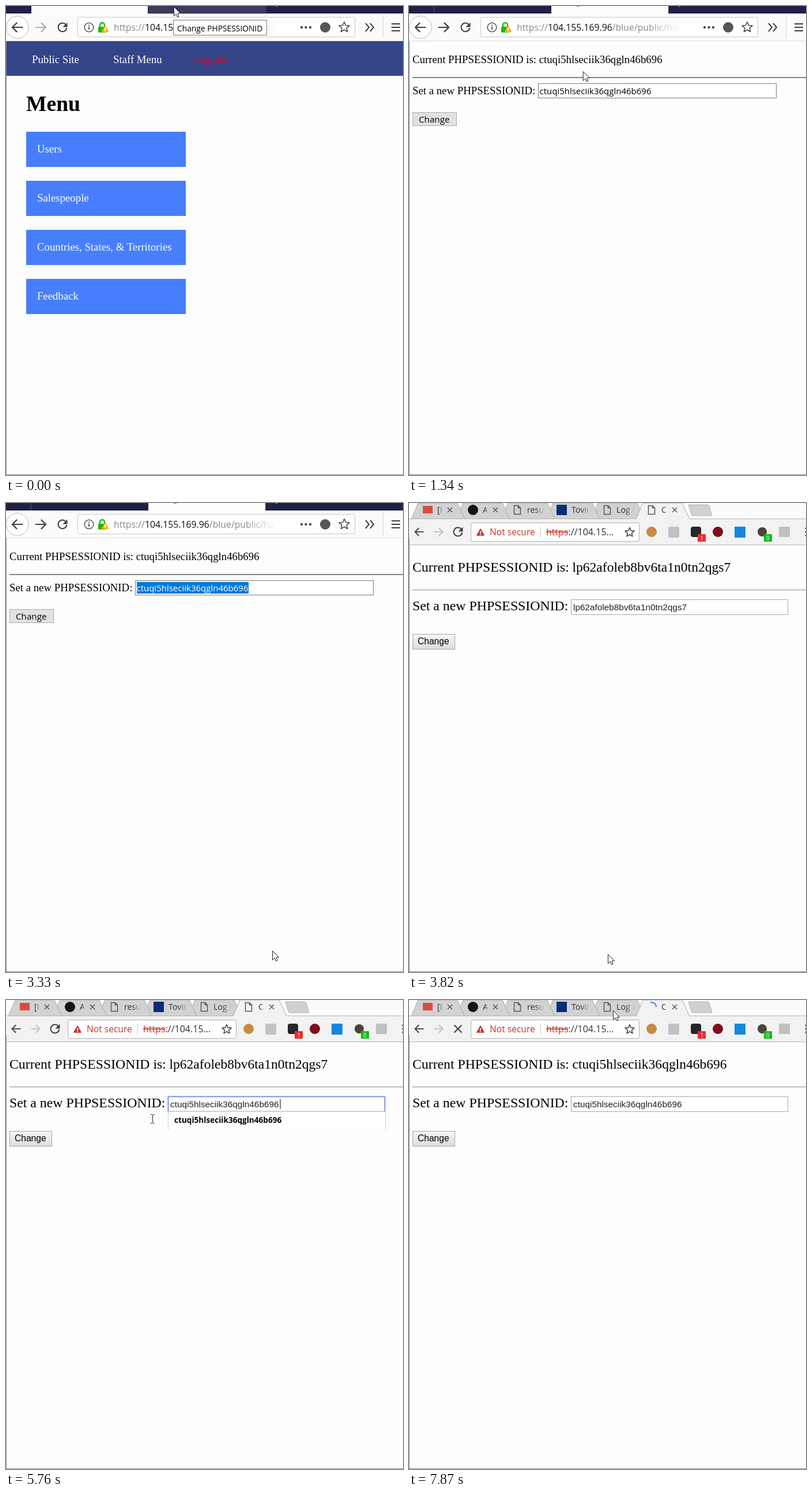
These frames come from a looping animation (689x813 px, 8 s). An HTML page:

```html
<!DOCTYPE html>
<html lang="en">
<head>
<meta charset="utf-8">
<title>Session change</title>
<style>
  html, body { margin: 0; width: 100%; height: 100%; overflow: hidden; background: #fdfdfd; }
  svg { display: block; }
  #stage { width: 100vw; height: 100vh; }
  text { white-space: pre; }
  .serif { font-family: "Liberation Serif", serif; }
  .arial { font: 15.5px "Liberation Sans", sans-serif; }
  .ui { font-family: "Open Sans", sans-serif; }
  .line { fill: none; stroke: #3f3f44; stroke-width: 2; }
  .thin { fill: none; stroke: #555; stroke-width: 1.5; }
</style>
</head>
<body>
<svg id="stage" viewBox="0 0 689 813" preserveAspectRatio="none"></svg>
<script>
const OLD_ID = 'lp62afoleb8bv6ta1n0tn2qgs7';
const NEW_ID = 'ctuqi5hlseciik36qgln46b696';
const LOOP = 8000;

const rect = (x, y, w, h, fill, more = '') =>
  `<rect x="${x}" y="${y}" width="${w}" height="${h}" fill="${fill}" ${more}/>`;
const box = (x, y, w, h, fill, stroke, more = '') =>
  rect(x + .5, y + .5, w, h, fill, `stroke="${stroke}" ${more}`);
const dot = (x, y, r, fill, more = '') => `<circle cx="${x}" cy="${y}" r="${r}" fill="${fill}" ${more}/>`;
const path = (d, more = 'class="line"') => `<path d="${d}" ${more}/>`;
const text = (x, y, size, str, cls = 'serif', more = '') =>
  `<text x="${x}" y="${y}" class="${cls}" style="font-size:${size}px" ${more}>${str}</text>`;
const group = (id, body) => `<g id="${id}">${body}</g>`;
const cross = (x, y, r, more) => path(`M${x - r} ${y - r}l${2 * r} ${2 * r}m0 ${-2 * r}l${-2 * r} ${2 * r}`, more);

function star(cx, cy, r) {
  const points = Array.from({ length: 10 }, (_, i) => {
    const a = i * Math.PI / 5 - Math.PI / 2, q = i % 2 ? r * .45 : r;
    return `${(cx + q * Math.cos(a)).toFixed(1)},${(cy + q * Math.sin(a)).toFixed(1)}`;
  });
  return `<polygon points="${points.join(' ')}" fill="none" stroke="#4a4a4e" stroke-width="1.6" stroke-linejoin="round"/>`;
}

const arrow = (x, y, dir, color, r = 8) => path(
  `M${x - dir * r} ${y}h${dir * 2 * r}m${-dir * r * .9} ${-r * .9}l${dir * r * .9} ${r * .9}l${-dir * r * .9} ${r * .9}`,
  `fill="none" stroke="${color}" stroke-width="2.2"`);

const reload = (x, y) => path(`M${x + 5.5} ${y - 5}a7.4 7.4 0 1 0 1.8 6`) +
  path(`M${x + 8.5} ${y - 8.5}v8h-8z`, 'fill="#3f3f44"');

const warning = (x, y, r, color) =>
  path(`M${x} ${y - r}l${r} ${1.8 * r}h${-2 * r}z`, `fill="${color}" stroke="${color}" stroke-linejoin="round"`) +
  rect(x - 1, y - r * .35, 2, r * .6, '#fff') + rect(x - 1, y + r * .42, 2, 1.6, '#fff');

function firefox() {
  const strip = rect(0, 0, 689, 13, '#1f2147') +
    group('tabMenu', rect(44, 0, 202, 13, '#fdfdfd') + rect(247, 0, 203, 12, '#3a3c5c')) +
    group('tabSession', rect(247, 0, 203, 13, '#fdfdfd') + rect(43, 0, 1, 12, '#4b4d70') +
      rect(291, 0, 5, 1, '#777')) +
    rect(450, 0, 1, 12, '#4b4d70') + rect(468, 0, 3, 1, '#b5b5c4');
  const bar = rect(0, 13, 689, 48, '#fbfbfb') + rect(0, 60, 689, 1, '#dcdcdc') +
    dot(20, 37, 19.3, '#fff', 'stroke="#b8b8b8"') + arrow(20, 37, -1, '#3f3f44', 9) +
    group('forwardOff', arrow(60, 37, 1, '#aaa', 9)) + group('forwardOn', arrow(60, 37, 1, '#3f3f44', 9)) +
    reload(98, 37) +
    box(124, 19, 481, 34, '#fff', '#c8c8c8', 'rx="2" id="urlBox"') +
    dot(144, 37, 7.8, 'none', 'stroke="#555" stroke-width="1.5"') + rect(143, 36, 2, 5, '#555') + rect(143, 32.5, 2, 2, '#555') +
    path('M163 37v-4a4 4 0 0 1 8 0v4', 'fill="none" stroke="#12bc00" stroke-width="2.4"') +
    rect(160, 36, 14, 10, '#12bc00', 'rx="1.5"') + warning(172, 40, 6, '#ffaf0f') +
    `<text x="187" y="43" class="ui" style="font-size:15.8px" fill="#8a8a8a">https://<tspan fill="#111">104.155.169.96</tspan>/blue/public/<tspan id="urlEnd"></tspan></text>` +
    rect(415, 22, 55, 30, 'url(#fade)') + rect(470, 22, 30, 30, '#fff') +
    [513, 520.5, 528].map(x => dot(x, 37, 2.2, '#4a4a4e')).join('') +
    dot(554, 37, 9, '#55555a') + star(587, 37, 9.5) +
    path('M624 30l6 7l-6 7m8-14l6 7l-6 7') + rect(654, 17, 1, 39, '#d5d5d5') +
    path('M669 31h15m-15 6h15m-15 6h15');
  const menu = rect(0, 61, 689, 60, '#334488') +
    text(45, 99, 18.8, 'Public Site', 'serif', 'fill="#fff"') +
    text(186, 99, 18.8, 'Staff Menu', 'serif', 'fill="#fff"') +
    text(326, 99, 18.8, 'Log out', 'serif', 'fill="#e8000f"') +
    text(35, 182, 37.6, 'Menu', 'serif', 'font-weight="700"') +
    ['Users', 'Salespeople', 'Countries, States, &amp; Territories', 'Feedback'].map((name, i) =>
      rect(35, 218 + i * 85, 277, 61, '#477efd') +
      text(54, 254 + i * 85, 18.8, name, 'serif', 'fill="#fff"')).join('') +
    box(290, 24, 162, 26, '#fff', '#767676') + text(297, 44, 13.8, 'Change PHPSESSIONID', 'ui');
  const session = text(6, 99, 18.8, 'Current PHPSESSIONID is: ' + NEW_ID) +
    rect(6, 123, 683, 2, '#858585') + text(6, 153, 18.8, 'Set a new PHPSESSIONID:') +
    box(224, 134, 413, 25, '#fff', '#7a7a7a', 'id="ffField"') +
    rect(227, 137, 194, 20, '#0078d7', 'id="ffSelect"') +
    text(226.5, 153, 15, NEW_ID, 'ui', 'id="ffValue"') +
    rect(307, 137, 1, 20, '#000', 'id="ffCaret"') +
    box(6, 184, 76, 23, '#e1e1e1', '#adadad') + text(17, 202, 15.2, 'Change', 'ui');
  return strip + bar + group('pageMenu', menu) + group('pageSession', session);
}

function tab(i, fill) {
  const x = 4 + 78 * i;
  return path(`M${x} 28L${x + 12} 0H${x + 80}L${x + 93} 28`, `fill="${fill}" stroke="#aaa"`);
}

const label = (x, w, str, fade) =>
  `<svg x="${x}" y="0" width="${w}" height="26">${text(0, 17, 14.3, str, 'ui', 'fill="#333"')}` +
  rect(w * .5, 0, w * .5, 26, `url(#${fade})`) + '</svg>';

const sheet = (x, id = '') => path(
  `M${x - 5.5} 4.5h7l4 4v11h-11zM${x + 1.5} 4.5v4h4`, `class="thin" ${id}`);

function chrome() {
  const tabs = rect(0, 0, 689, 28, '#fbfbfb') +
    path('M485 3h33q2 0 3 2l5 17h-33q-2 0-3-2z', 'fill="#d0d0d0" stroke="#b5b5b5"') +
    [4, 3, 2, 1, 0].map(i => tab(i, '#d2d2d2')).join('') +
    rect(0, 27, 689, 1, '#b4b4b4') + tab(5, '#f2f2f2') +
    rect(24, 5, 17, 13, '#dd4b3e') + dot(111, 12, 9, '#151515') + sheet(188) +
    rect(256, 3, 18, 18, '#0b2d79') + sheet(344) + sheet(421, 'id="sheet"') +
    path('M419 4.2A8 8 0 0 1 429 12', 'id="spinner" fill="none" stroke="#4285f4" stroke-width="2"') +
    label(49, 9, '[I', 'fadeTab') + label(128, 9, 'A', 'fadeTab') + label(205, 30, 'resul', 'fadeTab') +
    label(282, 33, 'Tovin', 'fadeTab') + label(360, 32, 'Log i', 'fadeTab') + label(438, 10, 'C', 'fadeActive') +
    [71, 150, 461].map(x => cross(x, 12, 4, 'class="thin"')).join('');
  const bar = rect(0, 28, 689, 44, '#f2f2f2') + rect(0, 72, 689, 1, '#b6b6b6') +
    arrow(18, 50, -1, '#505050', 7.5) + arrow(51, 50, 1, '#c4c4c4', 7.5) +
    group('reload', reload(85, 50)) + group('stop', cross(85, 50, 6.5, 'class="line"')) +
    box(107, 34, 292, 32, '#fff', '#b0b0b0', 'rx="2"') + warning(124, 51, 6.5, '#c5372c') +
    text(140, 56, 15.6, 'Not secure', 'ui', 'fill="#c5372c"') + rect(228, 41, 1, 19, '#c8c8c8') +
    text(238, 56, 16, '<tspan fill="#c5372c" text-decoration="line-through">https</tspan>://104.15...', 'ui', 'fill="#333"') +
    star(383, 51, 8.5) +
    dot(421, 50, 9, '#c98a45') + rect(450, 41, 19, 19, '#c2c2c2', 'rx="3"') +
    rect(489, 41, 18, 18, '#26262a', 'rx="4"') + rect(501, 54, 14, 13, '#ee2b2b') +
    text(505.5, 65, 10, '1', 'ui', 'fill="#fff"') + dot(536, 50, 9, '#800d1a') +
    rect(565, 41, 19, 19, '#1687dc') + dot(613, 50, 8, '#4c4238') + rect(616, 54, 14, 13, '#12bb12') +
    text(620, 65, 10, '0', 'ui', 'fill="#fff"') + rect(642, 41, 19, 18, '#c0c0c0') +
    [44, 50, 56].map(y => dot(689, y, 1.7, '#555')).join('');
  const page = text(6, 119, 23.75, 'Current PHPSESSIONID is:') +
    text(283.5, 119, 23.55, '', 'serif', 'id="current"') +
    rect(6, 150, 683, 1, '#9a9a9a') + rect(6, 151, 683, 1, '#e8e8e8') +
    text(6, 186, 23.8, 'Set a new PHPSESSIONID:') +
    box(281, 167, 376, 26, '#fff', '#a9a9a9', 'id="field"') +
    group('suggest', rect(281, 193, 378, 32, '#fff') + rect(281, 193, 378, 1, '#d8d8d8') +
      rect(281, 193, 1, 32, '#d0d0d0') + rect(658, 193, 1, 32, '#d0d0d0') +
      text(292, 213, 13.6, NEW_ID, 'ui', 'font-weight="700"')) +
    rect(285, 171, 196, 19, '#3390ff', 'id="select"') +
    text(285, 186, 15.35, '', 'arial', 'id="value"') +
    rect(475.5, 172, 1, 17, '#000', 'id="caret"') +
    box(6, 227, 73, 26, 'url(#button)', '#a4a4a4', 'id="submit"') + text(15, 245, 15.6, 'Change', 'arial');
  return tabs + bar + page;
}

const gradient = (id, dir, from, to, fromAlpha = 1) =>
  `<linearGradient id="${id}" ${dir}><stop stop-color="${from}" stop-opacity="${fromAlpha}"/>` +
  `<stop offset="1" stop-color="${to}"/></linearGradient>`;

document.getElementById('stage').innerHTML = '<defs>' +
  gradient('fade', '', '#fff', '#fff', 0) + gradient('fadeTab', '', '#d2d2d2', '#d2d2d2', 0) +
  gradient('fadeActive', '', '#f2f2f2', '#f2f2f2', 0) + gradient('button', 'x2="0" y2="1"', '#f6f6f6', '#dcdcdc') +
  '</defs>' + rect(0, 0, 689, 813, '#fdfdfd') + group('firefox', firefox()) + group('chrome', chrome()) +
  rect(0, 61, 1, 752, '#8a8a8a') + rect(0, 812, 689, 1, '#8a8a8a') +
  group('pointer',
    dot(0, 0, 9.7, 'none', 'id="ring" stroke="#444"') +
    path('M.5 .5V16.2L4.2 12.8 6.5 18 9 17 6.8 11.8H11.6z', 'id="arrow" fill="#fff" stroke="#222"') +
    path('M-3.5 -7.5h2.5l1 1 1-1h2.5M0 -6.5v13M-3.5 7.5h2.5l1-1 1 1h2.5', 'id="beam" fill="none" stroke="#222"'));

const el = {};
document.querySelectorAll('[id]').forEach(node => { el[node.id] = node; });
const show = (id, on) => { el[id].style.display = on ? '' : 'none'; };

// first step, last step, number of steps, end point
const moves = [
  [860, 1580, 7, 306, 158],
  [2970, 3330, 4, 462, 776],
  [3450, 3700, 3, 345, 782],
  [3970, 4100, 2, 324, 248],
  [4250, 4250, 1, 320, 112],
  [4390, 4520, 2, 358, 171],
  [4670, 4670, 1, 354, 179],
  [5760, 5760, 1, 254.5, 206],
  [5910, 6180, 3, 45, 244],
  [7000, 7600, 6, 355, 34],
  [7750, 7870, 2, 354, 18],
];

function pointerAt(t) {
  let x = 291, y = 1;
  for (const [start, end, steps, toX, toY] of moves) {
    if (t < start) break;
    const gap = (end - start) / (steps - 1) || 1;
    const p = Math.min(steps, Math.floor((t - start) / gap + .01) + 1) / steps;
    x += (toX - x) * p;
    y += (toY - y) * p;
  }
  return { x, y };
}

function draw(t) {
  const within = (a, b) => t >= a && t < b;
  const { x, y } = pointerAt(t);
  const inChrome = t >= 3820, onMenu = t < 500;
  const overUrl = !inChrome && y > 19 && y < 54;
  const overField = !inChrome && y > 134 && y < 160;
  const overButton = inChrome && x < 80 && y > 227 && y < 254;
  const beam = overUrl || overField || within(4520, 5910);

  show('firefox', !inChrome);
  show('chrome', inChrome);
  for (const id of ['tabMenu', 'pageMenu', 'forwardOff']) show(id, onMenu);
  for (const id of ['tabSession', 'pageSession', 'forwardOn']) show(id, !onMenu);
  el.urlEnd.textContent = onMenu ? 'sta' : 'ha';
  el.urlBox.setAttribute('stroke', overUrl ? '#a0a0a0' : '#c8c8c8');
  el.ffField.setAttribute('stroke', overField ? '#1a1a1a' : '#7a7a7a');
  el.ffValue.setAttribute('fill', t >= 2340 ? '#fff' : '#000');
  show('ffSelect', t >= 2340);
  show('ffCaret', within(1710, 2090));

  const focus = within(4830, 6860), selected = within(4970, 5760), loading = t >= 6860;
  el.current.textContent = t < 7000 ? OLD_ID : NEW_ID;
  el.value.textContent = t < 5760 ? OLD_ID : NEW_ID;
  el.value.setAttribute('fill', selected ? '#fff' : '#222');
  el.field.setAttribute('stroke', focus ? '#7597dc' : '#a9a9a9');
  el.field.setAttribute('stroke-width', focus ? 2 : 1);
  el.submit.setAttribute('stroke', overButton ? '#868686' : '#a4a4a4');
  show('select', selected);
  show('suggest', within(5760, 6860));
  show('caret', within(5760, 6180) || within(6710, 6860));
  show('reload', !loading);
  show('stop', loading);
  show('sheet', !loading);
  show('spinner', loading);
  const turn = Math.floor((t - 7870) / 125) * 30;
  el.spinner.setAttribute('transform', `rotate(${turn} 421 12)`);

  el.pointer.setAttribute('transform', `translate(${x} ${y})`);
  show('arrow', !beam);
  show('beam', beam);
  show('ring', within(500, 620) || within(1580, 1710) || within(4670, 4830));
}

const begin = performance.now();
function tick() {
  draw((performance.now() - begin) % LOOP);
  requestAnimationFrame(tick);
}
tick();
</script>
</body>
</html>
```
